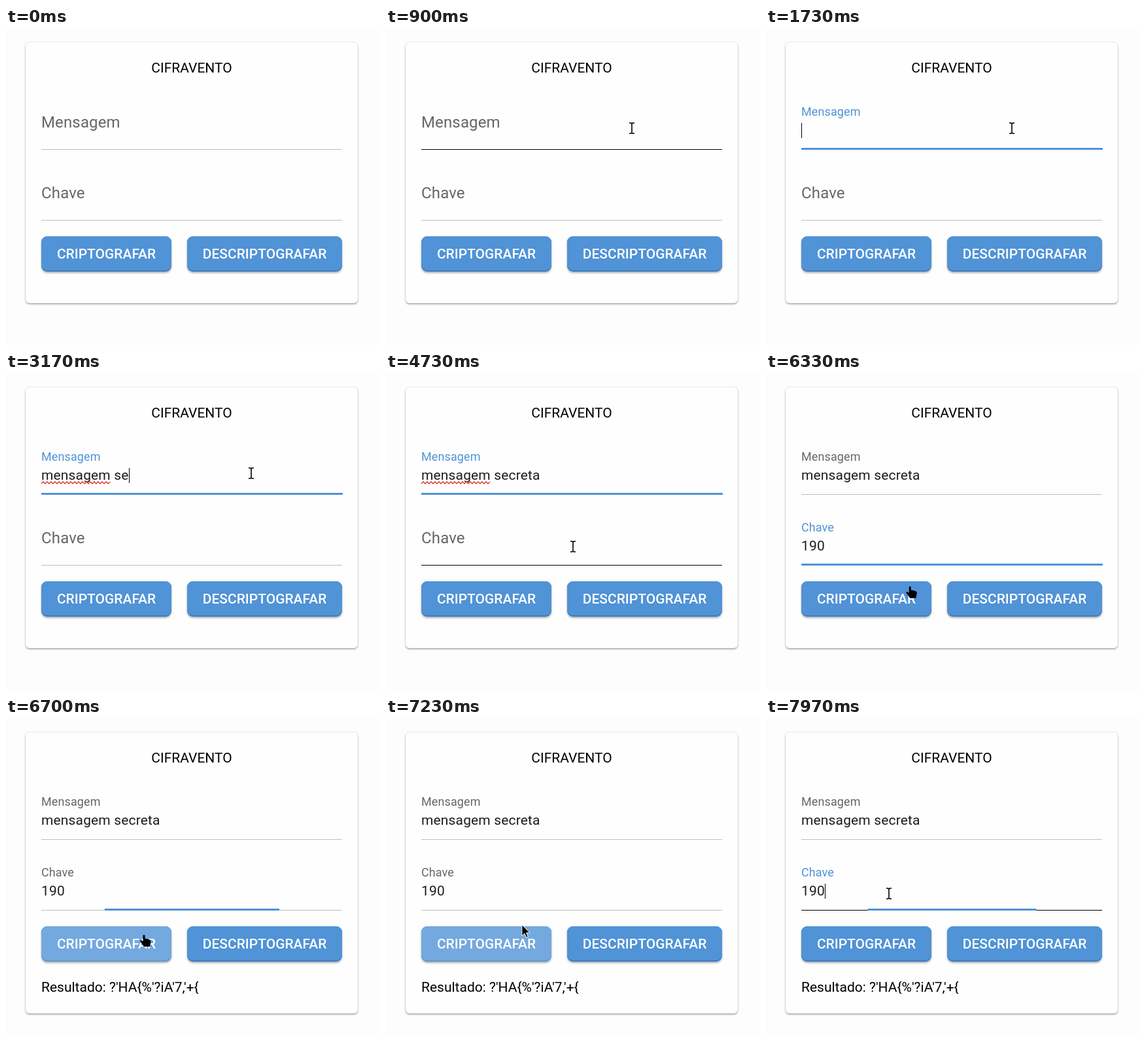
Write an HTML page that moves like this. It is 572 px wide and 484 px high and loops after 8 s.

```html
<!DOCTYPE html>
<html lang="pt-BR">
<head>
<meta charset="utf-8">
<title>Cifravento</title>
<style>
  html, body { margin: 0; width: 100%; height: 100%; overflow: hidden; background: #fdfdfd; }
  svg { display: block; width: 572px; height: 484px; }
  text { font: 400 21px Roboto, sans-serif; white-space: pre; fill: #000; }
  .label { font-size: 24px; letter-spacing: .006em; }
  .value { letter-spacing: .007em; fill: #1d1d1d; }
  .button text { font-weight: 500; fill: #fff; }
  .button { filter: drop-shadow(0 2px 1.5px rgba(0, 0, 0, .32)); }
  #card { fill: #fefefe; filter: drop-shadow(0 0 1.2px rgba(0, 0, 0, .2)) drop-shadow(0 2px 1.2px rgba(0, 0, 0, .26)); }
</style>
</head>
<body>
<svg id="stage" viewBox="0 0 572 484" xmlns="http://www.w3.org/2000/svg">
  <rect id="card" x="30" y="22" width="508" height="398" rx="6"/>
  <text x="284" y="68" text-anchor="middle">CIFRAVENTO</text>
  <text id="result" x="54" y="418">Resultado: ?'HA{%'?iA'7,'+{</text>
</svg>
<script>
const LOOP = 8000, BLUE = '#5093d6', GREY = '#666', LEFT = 54, WIDTH = 460;
const stage = document.getElementById('stage');
const card = document.getElementById('card');
const result = document.getElementById('result');

function add(parent, tag, attrs, text) {
  const el = document.createElementNS('http://www.w3.org/2000/svg', tag);
  set(el, attrs);
  if (text) el.textContent = text;
  parent.appendChild(el);
  return el;
}
function set(el, attrs) {
  for (const key in attrs) el.setAttribute(key, attrs[key]);
}
const show = (el, on) => set(el, { visibility: on ? 'visible' : 'hidden' });
const clamp = v => Math.max(0, Math.min(1, v));

// cubic-bezier(.4, 0, .2, 1)
function ease(x) {
  x = clamp(x);
  let lo = 0, hi = 1, u = x;
  for (let i = 0; i < 20; i++) {
    u = (lo + hi) / 2;
    const r = 1 - u;
    if (1.2 * u * r * r + .6 * u * u * r + u * u * u < x) lo = u; else hi = u;
  }
  return u * u * (3 - 2 * u);
}

// Eased 0..1 level that is on during each [start, end] span
function level(spans, t, length = 360) {
  return spans.reduce((sum, [a, b]) => sum + ease((t - a) / length) - ease((t - b) / length), 0);
}
const within = (spans, t) => spans.find(([a, b]) => t >= a && t < b);

function makeField(name, y, opts) {
  const line = add(stage, 'rect', { x: LEFT, y: y + 185, width: WIDTH, height: 1 });
  const bar = add(stage, 'rect', { y: y + 183, height: 3, fill: BLUE });
  const label = add(stage, 'text', { class: 'label' }, name);
  const value = add(stage, 'text', { class: 'value', x: LEFT, y: y + 163 });
  const caret = add(stage, 'rect', { y: y + 145, width: 1, height: 23, fill: '#000' });
  return { y, line, bar, label, value, caret, ...opts };
}

const fields = [
  makeField('Mensagem', 0, {
    content: 'mensagem secreta', focus: [[1300, 4850]], hover: [[540, 4390]],
    keys: [...'mensagem secreta'].map((c, i) => (i < 11 ? 1750 : 1860) + 130 * i)
  }),
  makeField('Chave', 108, {
    content: '190', focus: [[4850, 6586], [7836, 9000]], hover: [[4430, 6080], [7400, 9000]],
    keys: [5230, 5390, 5560]
  })
];

let wave = 'M54 169';
for (let x = 57, up = true; x <= 160; x += 3, up = !up) wave += `L${x} ${up ? 166 : 169}`;
const squiggle = add(stage, 'path', { d: wave, fill: 'none', stroke: '#e0332a', 'stroke-width': 1.4 });

function makeButton(x, width, name) {
  const g = add(stage, 'g', { class: 'button' });
  const box = { x, y: 318, width, rx: 9 };
  add(g, 'rect', { ...box, height: 54, fill: '#3f7dbd' });
  add(g, 'rect', { ...box, height: 52, fill: BLUE });
  const tint = add(g, 'rect', { ...box, height: 54, fill: '#fff', opacity: 0 });
  add(g, 'text', { x: x + width / 2, y: 352, 'text-anchor': 'middle' }, name);
  return tint;
}
const tint = makeButton(54, 199, 'CRIPTOGRAFAR');
makeButton(277, 237, 'DESCRIPTOGRAFAR');

const halo = { stroke: '#fff', 'stroke-width': 1, 'stroke-linejoin': 'round' };
const cursors = {
  arrow: add(stage, 'path', { d: 'M0 0V17L4 13.2L6.8 19.5L9.5 18.3L6.8 12.2H12.3Z', ...halo }),
  beam: add(stage, 'path', {
    d: 'M-4-8H-1.5L0-7L1.5-8H4M0-7V7M-4 8H-1.5L0 7L1.5 8H4',
    fill: 'none', stroke: '#000', 'stroke-width': 1.6
  }),
  hand: add(stage, 'path', {
    d: 'M-1.5 1Q0-1 1.5 1V5.5L8 7Q11 8 10.5 11L9 18H0L-5.5 10.5Q-6.5 7.5-3.5 8.5L-1.5 10Z'
  })
};

// Each move: start, end, then from, bend and to points
const moves = [
  [100, 800, 585, 425, 530, 190, 376, 153],
  [2300, 2450, 376, 153, 375.5, 153, 375, 153],
  [4250, 4650, 375, 153, 340, 215, 286, 265],
  [5970, 6430, 286, 265, 250, 310, 211, 331],
  [7050, 7650, 211, 331, 205, 295, 188, 268]
];
function pointer(t) {
  const [a, b, x0, y0, x1, y1, x2, y2] = moves.filter(m => t >= m[0]).pop() || moves[0];
  const k = clamp((t - a) / (b - a)), u = k * k * (3 - 2 * k), r = 1 - u;
  return [r * r * x0 + 2 * r * u * x1 + u * u * x2, r * r * y0 + 2 * r * u * y1 + u * u * y2];
}
function cursorAt(x, y) {
  const inside = (l, top, r, bottom) => x >= l && x <= r && y >= top && y <= bottom;
  if (inside(54, 102, 514, 187) || inside(54, 210, 514, 295)) return 'beam';
  return inside(54, 318, 253, 372) || inside(277, 318, 514, 372) ? 'hand' : 'arrow';
}

function drawField(f, t) {
  const span = within(f.focus, t);
  const typed = f.keys.filter(k => k <= t).length;
  const up = ease((t - f.focus[0][0]) / 360);
  const barWidth = (WIDTH + 1) * level(f.focus, t);
  const shade = Math.round(190 * (1 - level(f.hover, t)));
  set(f.line, { fill: `rgb(${shade},${shade},${shade})` });
  set(f.bar, { x: LEFT + (WIDTH + 1 - barWidth) / 2, width: barWidth });
  set(f.label, {
    transform: `translate(${LEFT} ${f.y + 152 - 18 * up}) scale(${1 - .25 * up})`,
    style: `fill:${span ? BLUE : GREY}`
  });
  const text = f.content.slice(0, typed);
  if (f.value.textContent !== text) f.value.textContent = text;

  let lit = false;
  if (span) {
    const last = Math.max(span[0], ...f.keys.slice(0, typed));
    lit = Math.floor((t - last) / 530) % 2 === 0;
    const advance = typed ? f.value.getComputedTextLength() : 0;
    set(f.caret, { x: Math.round(LEFT + advance) });
  }
  show(f.caret, lit);
}

function draw(t) {
  fields.forEach(f => drawField(f, t));
  show(squiggle, t >= fields[0].keys[8] && t < 4850);
  const done = t >= 6660;
  set(card, { height: done ? 429 : 398 });
  show(result, done);
  set(tint, { opacity: .2 * level([[6310, 7250]], t, 300) });

  const [x, y] = pointer(t), kind = cursorAt(x, y);
  for (const name in cursors) show(cursors[name], name === kind);
  set(cursors[kind], { transform: `translate(${x} ${y})` });
}

const start = performance.now();
function tick() {
  draw((performance.now() - start) % LOOP);
  requestAnimationFrame(tick);
}
tick();
</script>
</body>
</html>
```
